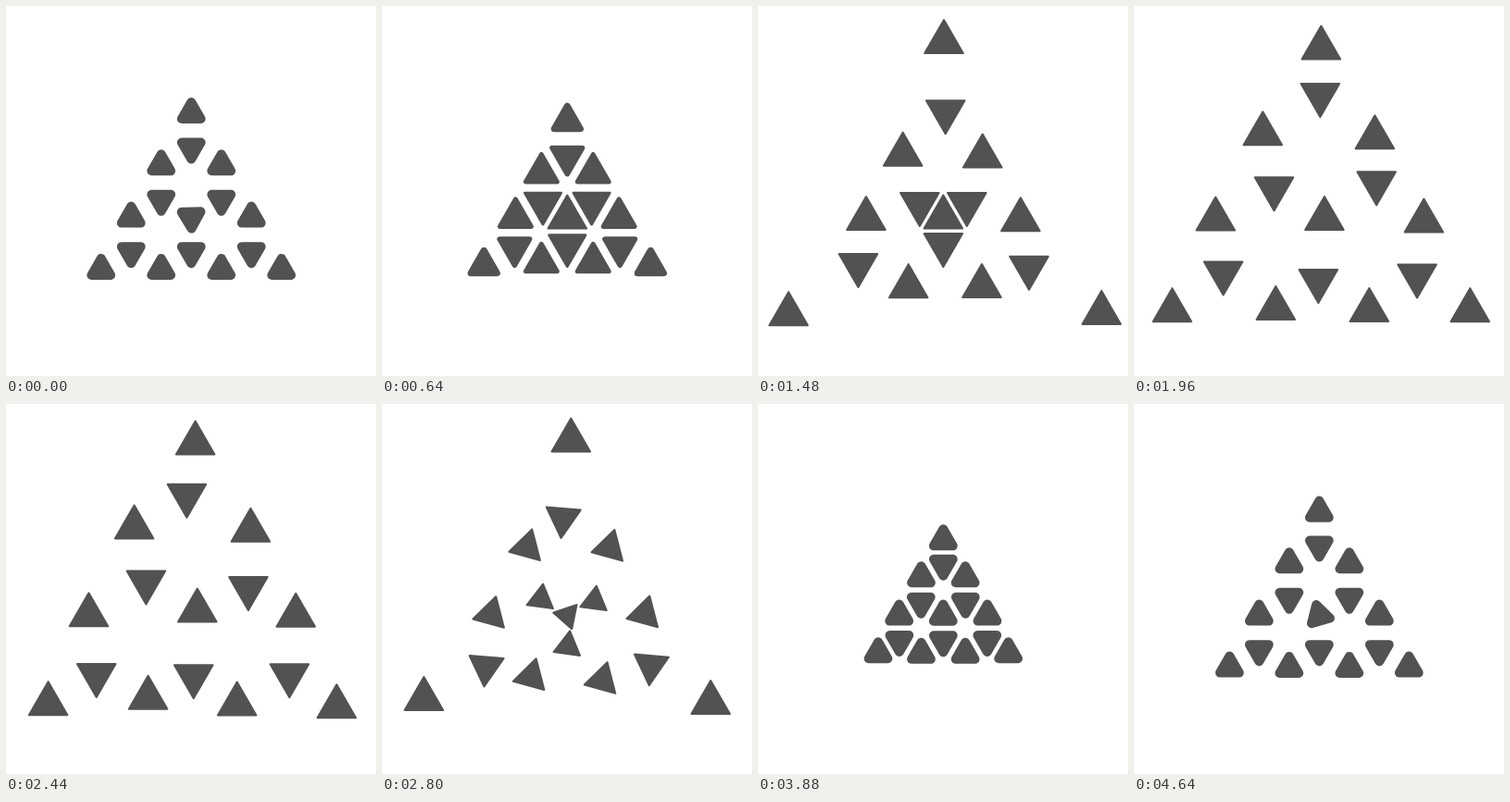
Write an HTML page that moves like this. It is 400 by 400 pixels and loops after 4.68 s.

```html
<!DOCTYPE html>
<html lang="en">
<head>
<meta charset="utf-8">
<title>Triangles</title>
<style>
  html, body { margin: 0; width: 100%; height: 100%; overflow: hidden; background: #fff; }
  svg { display: block; width: 100%; height: 100%; }
</style>
</head>
<body>
<svg id="stage" viewBox="0 0 400 400"></svg>
<script>
const LOOP = 4680, CX = 200.3, CY = 228.6, INK = '#525252';
const H = Math.sqrt(3) / 2;
const NS = 'http://www.w3.org/2000/svg';
const stage = document.getElementById('stage');

const clamp = u => Math.max(0, Math.min(1, u));
const mix = (a, b, p) => a + (b - a) * p;
const smooth = u => (u = clamp(u), u * u * (3 - 2 * u));
const quadInOut = u => (u = clamp(u), u < .5 ? 2 * u * u : 1 - 2 * (1 - u) ** 2);
const cubicIn = u => clamp(u) ** 3;
const backOut = u => u <= 0 ? 0 : (u = clamp(u) - 1, 1 + 2.4 * u ** 3 + 1.4 * u * u);
function spring(ms) {
  if (ms <= 0) return 0;
  const a = ms * .0091, k = .417;
  return 1 - Math.exp(-k * a) * (Math.cos(a) + k * Math.sin(a));
}

// drift of each floating piece, row by row
const DRIFT = [
  [2, 4],
  [-6, 5], [1, -7], [5, 9],
  [-2, 2], [7, 1], [8, 2], [6, -5], [3, 4],
  [3, 7], [5, -3], [8, 3], [-1, 4], [-1, 5], [-3, 0], [1, 7]
];

// unit grid of four rows, centred on the middle piece
const tris = [];
for (let row = 0; row < 4; row++) {
  for (let i = 0; i <= 2 * row; i++) {
    const down = i % 2 === 1;
    const x = (i - row) / 2;
    const y = (row - 2) * H - (down ? H / 3 : 0);
    const n = tris.length;
    const el = document.createElementNS(NS, 'polygon');
    el.setAttribute('fill', INK);
    el.setAttribute('stroke', INK);
    el.setAttribute('stroke-linejoin', 'round');
    stage.appendChild(el);
    tris.push({ el, x, y, down, d: Math.hypot(x, y), drift: DRIFT[n], turn: n % 3 === 1 || n === 15 ? -1 : 1 });
  }
}

// burst apart, float, then spring back together
function burst(t, { d, drift, turn }) {
  const out = backOut((t - 1044 - 758 * (1 - d / Math.sqrt(3))) / 745);
  const ms = t - 2522 - 164 * d;
  const back = spring(ms);
  const soft = smooth((ms - 250) / 190);
  const a = -turn * Math.max(-.2, (t - 1960) / 840) * Math.PI / 2;
  const w = clamp(out) * (1 - clamp(back));
  return {
    pitch: mix(mix(51, 108, out), 48, back),
    size: 13 - 4.4 * clamp(back) + 2.4 * soft,
    round: 1 + 4 * soft,
    angle: 240 * smooth((ms - 60) / 355) + 12 * Math.sin(Math.PI * clamp((ms - 400) / 500)),
    dx: w * (drift[0] * Math.cos(a) - drift[1] * Math.sin(a)),
    dy: w * (drift[0] * Math.sin(a) + drift[1] * Math.cos(a))
  };
}

// spread, spin in a wave, then lock into the tight grid
function lock(t, { d }) {
  const out = quadInOut((t - 4180 - 95 * d) / 330);
  const fit = cubicIn((t - LOOP - 207 - 87.5 * d) / 400);
  return {
    pitch: mix(mix(48, 65, out), 51, fit),
    size: mix(11, 13, fit),
    round: mix(5, 1, fit),
    angle: -120 * quadInOut((t - 4600 - 150 * d) / 160),
    dx: 0,
    dy: 0
  };
}

function draw(t) {
  for (const tri of tris) {
    const s = t < 1000 ? lock(t + LOOP, tri) : t < 4180 ? burst(t, tri) : lock(t, tri);
    const x = CX + tri.x * s.pitch + s.dx;
    const y = CY + tri.y * s.pitch + s.dy;
    const r = 2 * (s.size - s.round);
    const points = [0, 120, 240].map(k => {
      const a = (k + s.angle + (tri.down ? 180 : 0)) * Math.PI / 180;
      return (x + r * Math.sin(a)).toFixed(2) + ',' + (y - r * Math.cos(a)).toFixed(2);
    });
    tri.el.setAttribute('points', points.join(' '));
    tri.el.setAttribute('stroke-width', (2 * s.round).toFixed(2));
  }
}

const start = performance.now();
function tick() {
  draw((performance.now() - start) % LOOP);
  requestAnimationFrame(tick);
}
tick();
</script>
</body>
</html>
```
